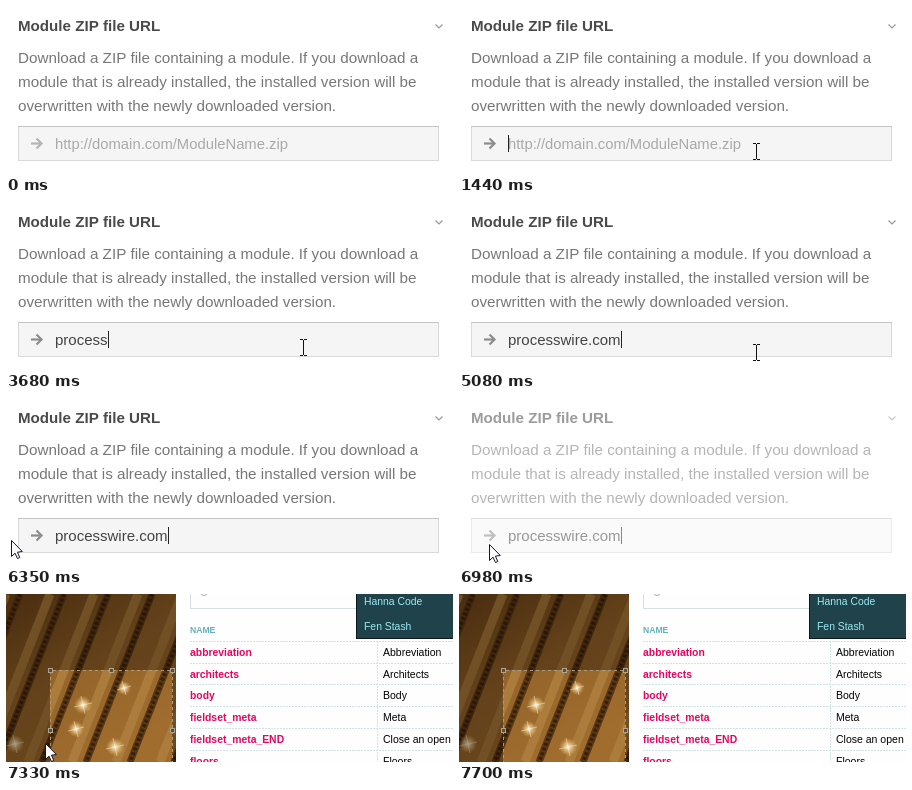
Write an HTML page with a canvas that moves like this. It is 447 px wide and 168 px high and loops after 8 s.

```html
<!DOCTYPE html>
<html lang="en">
<head>
<meta charset="utf-8">
<title>Module install</title>
<style>
html, body { margin: 0; width: 100%; height: 100%; overflow: hidden; background: #fff; }
canvas { display: block; width: 447px; height: 168px; }
</style>
</head>
<body>
<canvas id="stage" width="447" height="168"></canvas>
<script>
const LOOP = 8000;
const W = 447, H = 168;
const ctx = document.getElementById('stage').getContext('2d');
const FONT = '"Liberation Sans", Arial, sans-serif';
const ADDRESS = 'processwire.com';

// One time per typed character.
const KEY_TIMES = [2720, 2920, 3010, 3100, 3380, 3570, 3680, 4060,
  4230, 4320, 4410, 4500, 4590, 4780, 5080];

// time, kind, x, y: the pointer holds each place until the next entry.
const POINTER = [
  [0, 'none', 0, 0],
  [490, 'beam', 298, 161], [580, 'beam', 299, 151], [670, 'beam', 300, 143], [770, 'beam', 300, 138],
  [1350, 'beam', 303, 138], [1440, 'beam', 297, 137],
  [4410, 'beam', 297, 140], [4500, 'beam', 297, 142],
  [5890, 'beam', 290, 141], [5980, 'beam', 250, 136], [6070, 'beam', 180, 130],
  [6170, 'beam', 95, 130], [6260, 'beam', 30, 136], [6350, 'arrow', 5, 142],
  [6530, 'arrow', 6, 139], [6620, 'arrow', 13, 144], [6700, 'arrow', 23, 149], [6790, 'arrow', 28, 149],
  [6980, 'arrow', 30, 146], [7330, 'arrow', 39, 149],
  [7520, 'arrow', 150, 76], [7610, 'arrow', 262, 2], [7700, 'none', 0, 0]
];

// time, strength of the white veil over the form.
const VEIL = [[0, 0], [6980, 0.45], [7060, 0.8]];

const latest = (track, t) => track.filter(key => key[0] <= t).pop();

function text(str, x, y, size, color, weight = 'normal') {
  ctx.font = `${weight} ${size}px ${FONT}`;
  ctx.fillStyle = color;
  ctx.fillText(str, x, y);
}

function rect(x, y, w, h, color) {
  ctx.fillStyle = color;
  ctx.fillRect(x, y, w, h);
}

function line(points, color, width = 1, dash = []) {
  ctx.beginPath();
  points.forEach(([x, y]) => ctx.lineTo(x, y));
  ctx.strokeStyle = color;
  ctx.lineWidth = width;
  ctx.setLineDash(dash);
  ctx.stroke();
  ctx.setLineDash([]);
}

function drawForm(t) {
  const focused = t >= 1350;
  text('Module ZIP file URL', 12, 25, 15.15, '#4a4a4a', 'bold');
  line([[429.5, 18.5], [433, 22], [436.5, 18.5]], '#999', 1.2);
  ['Download a ZIP file containing a module. If you download a',
    'module that is already installed, the installed version will be',
    'overwritten with the newly downloaded version.'
  ].forEach((row, i) => text(row, 12, 57 + 24 * i, 15.23, '#777'));

  rect(12, 120, 421, 35, '#d9d9d9');
  rect(12, 120, 421, 1, '#c4c4c4');
  rect(13, 121, 419, 33, '#f5f5f5');
  const iconColor = focused ? '#8c8c8c' : '#b5b5b5';
  line([[25, 137.5], [35, 137.5]], iconColor, 2.2);
  line([[30.5, 132.5], [35.5, 137.5], [30.5, 142.5]], iconColor, 2.2);

  const typed = ADDRESS.slice(0, KEY_TIMES.filter(k => k <= t).length);
  if (typed) text(typed, 49, 143, 15, '#444');
  else text('http://domain.com/ModuleName.zip', 49, 143, 14.82, '#a9a9a9');
  if (t >= 1440) {
    ctx.font = `15px ${FONT}`;
    rect(Math.round(49 + ctx.measureText(typed).width), 129, 1, 17, '#222');
  }
}

function star(x, y, r) {
  const glow = ctx.createRadialGradient(x, y, 0, x, y, r);
  glow.addColorStop(0, '#fffdf0');
  glow.addColorStop(0.3, 'rgba(255,236,190,.7)');
  glow.addColorStop(1, 'rgba(255,200,110,0)');
  rect(x - r, y - r, 2 * r, 2 * r, glow);
  line([[x - r, y + 2], [x + r, y - 2]], 'rgba(255,246,220,.6)', 0.8);
  line([[x - 2, y - r], [x + 2, y + r]], 'rgba(255,246,220,.6)', 0.8);
}

function drawPhoto() {
  ctx.save();
  ctx.beginPath();
  ctx.rect(0, 0, 170, H);
  ctx.clip();
  const base = ctx.createLinearGradient(0, 0, 90, H);
  base.addColorStop(0, '#6b4419');
  base.addColorStop(0.5, '#94642a');
  base.addColorStop(1, '#a06d2e');
  rect(0, 0, 170, H, base);
  for (let x = 14; x < 240; x += 44) {
    const slope = dx => [[x + dx, 0], [x + dx - 66, H]];
    line(slope(-14), '#ab7c3c', 9);
    line(slope(0), '#5a3813', 7);
    line(slope(0), '#38200b', 4, [3, 2]);
  }
  [[77, 111, 9], [70, 135, 8], [118, 94, 7], [109, 153, 9], [9, 150, 9]]
    .forEach(s => star(...s));

  ctx.beginPath();
  ctx.rect(0, 0, 170, H);
  ctx.rect(44, 76, 122, 100);
  ctx.fillStyle = 'rgba(20,8,0,.38)';
  ctx.fill('evenodd');
  line([[44.5, 170], [44.5, 76.5], [166.5, 76.5], [166.5, 170]], '#a89a80', 1, [3, 3]);
  [[44, 76], [105, 76], [166, 76], [44, 136], [166, 136]].forEach(([x, y]) => {
    rect(x - 2, y - 2, 5, 5, '#b0a48e');
    rect(x - 1, y - 1, 3, 3, '#5d4b32');
  });
  ctx.restore();
}

function drawTable() {
  line([[184.5, 0], [184.5, 14.5], [350, 14.5]], '#d3dfe1');
  text('Filters', 210, 0, 11, '#999');
  ctx.beginPath();
  ctx.arc(198, -2, 3.5, 0, 7);
  ctx.strokeStyle = '#aaa';
  ctx.stroke();
  text('NAME', 184, 39, 8.6, '#62b0be', 'bold');
  line([[371.5, 47], [371.5, H]], '#d0e4e8', 1, [2, 1]);
  [['abbreviation', 'Abbreviation'], ['architects', 'Architects'], ['body', 'Body'],
    ['fieldset_meta', 'Meta'], ['fieldset_meta_END', 'Close an open fieldset'], ['floors', 'Floors']
  ].forEach(([name, label], i) => {
    const y = 47 + Math.round(21.7 * i);
    line([[184, y + 0.5], [W, y + 0.5]], '#d0e4e8', 1, [2, 1]);
    text(name, 184, y + 14.5, 10.4, '#e8055f', 'bold');
    text(label, 377, y + 14.5, 10.5, '#000');
  });
  rect(350, 0, 97, 45, '#0c1719');
  rect(351, 0, 96, 44, '#20424a');
  text('Hanna Code', 358, 10.5, 10.4, '#9aeaf3');
  text('Fen Stash', 358, 36, 10.4, '#9aeaf3');
}

function drawPointer(t) {
  const [, kind, x, y] = latest(POINTER, t);
  ctx.save();
  ctx.translate(x, y);
  if (kind === 'beam') {
    rect(-3, 0, 3, 1, '#111');
    rect(1, 0, 3, 1, '#111');
    rect(0, 1, 1, 15, '#111');
    rect(-3, 16, 3, 1, '#111');
    rect(1, 16, 3, 1, '#111');
  } else if (kind === 'arrow') {
    ctx.beginPath();
    [[0.5, 0.5], [0.5, 16.5], [4, 13.2], [6.5, 18.5], [8.8, 17.5], [6.4, 12.2], [11.3, 11.5]]
      .forEach(p => ctx.lineTo(...p));
    ctx.closePath();
    ctx.fillStyle = '#fff';
    ctx.fill();
    ctx.strokeStyle = '#15152a';
    ctx.lineWidth = 1;
    ctx.stroke();
  }
  ctx.restore();
}

function draw(t) {
  rect(0, 0, W, H, t < 7240 ? '#fff' : '#fefefe');
  if (t < 7240) {
    drawForm(t);
    rect(0, 0, W, H, `rgba(255,255,255,${latest(VEIL, t)[1]})`);
  } else if (t >= 7330) {
    drawPhoto();
    drawTable();
  }
  drawPointer(t);
}

const start = performance.now();
function tick() {
  draw((performance.now() - start) % LOOP);
  requestAnimationFrame(tick);
}
tick();
</script>
</body>
</html>
```
